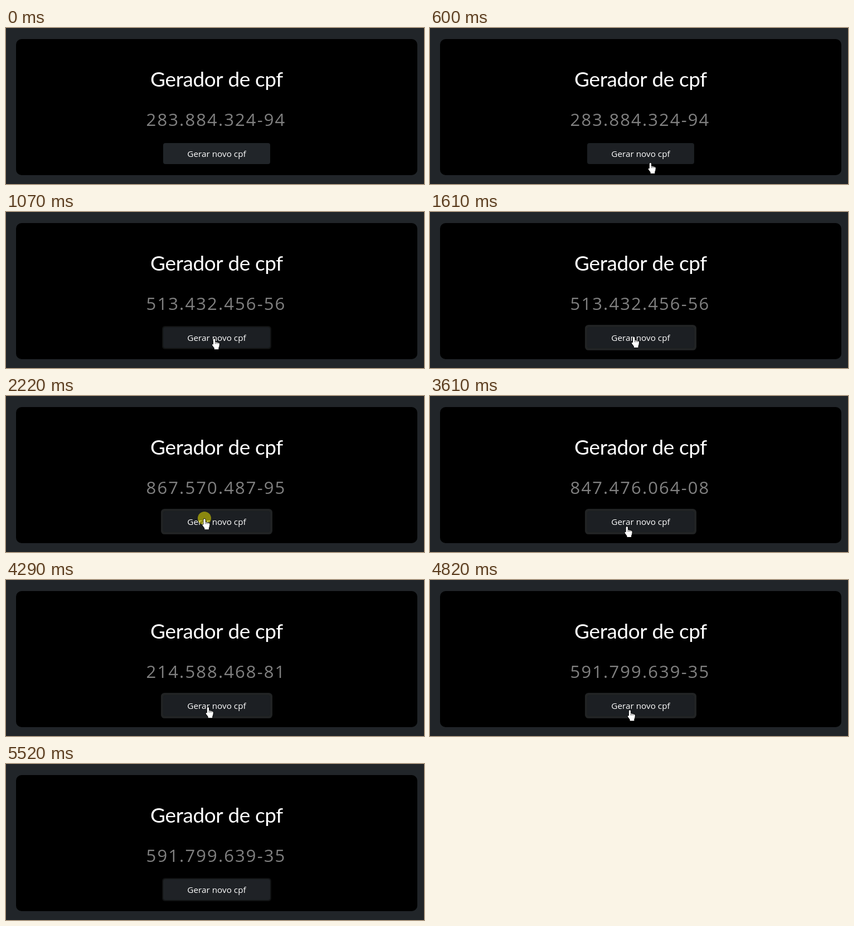
These frames come from a looping animation (750x282 px, 5580 ms). An HTML page with a canvas:

```html
<!DOCTYPE html>
<html lang="pt-BR">
<head>
<meta charset="utf-8">
<title>Gerador de cpf</title>
<style>
  html, body { margin: 0; width: 100%; height: 100%; overflow: hidden; background: #212529; }
  canvas { display: block; }
</style>
</head>
<body>
<canvas id="stage" width="750" height="282"></canvas>
<script>
const ctx = document.getElementById('stage').getContext('2d');
const LOOP = 5580, ENTER = 190, LEAVE = 5170, TICK = 67.5;
const FIRST_CLICK = 1010, CLICK_GAP = 603, PRESS = 60;

const numbers = [
  '283.884.324-94', '513.432.456-56', '867.570.487-95', '305.618.729-40',
  '976.971.433-05', '847.476.064-08', '214.588.468-81', '591.799.639-35'
];

// resting places of the pointer tip: time, x, y
const stops = [
  [190, 435, 270], [870, 374, 229], [1070, 374, 229], [2220, 356.5, 222],
  [2980, 367, 230], [3610, 353.5, 236], [4290, 363, 230], [5170, 356, 239]
];

const hand = new Path2D('M-2 1.6Q-2 0 -.4 0T1.2 1.6V6L6.5 7Q9 7.6 9 10L8.3 14.5 7.4 16.3V19.2H-.2V17L-4 11.8Q-4.6 9 -2 10.4Z');
const arrow = new Path2D('M0 0V16L3.7 12.5 6.2 18.5 8.5 17.5 6 11.7H11.5Z');

const clamp = v => Math.max(0, Math.min(1, v));
const smooth = k => k * k * (3 - 2 * k);
const mix = (a, b, k) => a + (b - a) * k;
const blend = (a, b, k) => `rgb(${a.map((v, i) => mix(v, b[i], k))})`;

function pointerAt(t) {
  const i = stops.findIndex(s => s[0] > t);
  const [t0, x0, y0] = stops[i - 1], [t1, x1, y1] = stops[i];
  const k = smooth((t - t0) / (t1 - t0));
  return [mix(x0, x1, k), mix(y0, y1, k)];
}

function clickState(t) {
  const since = t - FIRST_CLICK, last = numbers.length - 1;
  const done = Math.floor((since - PRESS) / CLICK_GAP) + 1;
  return {
    count: Math.max(0, Math.min(last, done)),
    down: since >= 0 && since < last * CLICK_GAP && since % CLICK_GAP < PRESS
  };
}

function box(x, y, w, h, r, color) {
  ctx.fillStyle = color;
  ctx.beginPath();
  ctx.roundRect(x, y, w, h, r);
  ctx.fill();
}

function label(str, x, y, font, color, spacing = 0) {
  ctx.font = font;
  ctx.letterSpacing = spacing + 'px';
  ctx.fillStyle = color;
  ctx.fillText(str, x, y);
}

function drawButton(t) {
  const fade = clamp((LOOP - t) / 120);
  const focus = Math.min(clamp((t - FIRST_CLICK) / 120), fade);
  const hover = Math.min(clamp((t - 470) / 150), fade);
  const spread = 4 * focus;
  if (focus) {
    box(282 - spread, 208 - spread, 192 + 2 * spread, 38 + 2 * spread,
      4 + spread * 0.6, `rgba(66,70,73,${focus / 2})`);
  }
  box(282, 208, 192, 38, 4, blend([33, 37, 41], [26, 30, 33], hover));
  box(283, 209, 190, 36, 3, blend([33, 37, 41], [28, 31, 35], hover));
  label('Gerar novo cpf', 378, 233, '15.3px "Open Sans", sans-serif', '#fff');
}

function drawPointer(t, down) {
  if (t < ENTER || t >= LEAVE) return;
  const step = ENTER + Math.floor((t - ENTER) / TICK) * TICK;
  const [x, y] = pointerAt(step);
  if (down) {
    ctx.fillStyle = 'rgba(232,222,0,.55)';
    ctx.beginPath();
    ctx.arc(x - 0.5, y - 1, 12, 0, 2 * Math.PI);
    ctx.fill();
  }
  const shape = y < 246 ? hand : arrow;
  ctx.save();
  ctx.translate(x, y);
  ctx.lineWidth = 1.4;
  ctx.strokeStyle = '#000';
  ctx.stroke(shape);
  ctx.fillStyle = '#fff';
  ctx.fill(shape);
  if (shape === hand) {
    ctx.lineWidth = 0.7;
    ctx.beginPath();
    for (let dx = 1.4; dx < 7; dx += 2.5) {
      ctx.moveTo(dx, 6.5);
      ctx.lineTo(dx, 9.5);
    }
    ctx.stroke();
  }
  ctx.restore();
}

function draw(now) {
  const t = now % LOOP;
  const { count, down } = clickState(t);
  ctx.textAlign = 'center';
  ctx.fillStyle = '#212529';
  ctx.fillRect(0, 0, 750, 282);
  box(18, 20, 720, 246, 10, '#000');
  label('Gerador de cpf', 378, 105.5, '37px Lato, "Open Sans", sans-serif', '#fff', -0.4);
  label(numbers[count], 377, 177, '500 31px "Open Sans", sans-serif', '#808080', 2.1);
  drawButton(t);
  drawPointer(t, down);
}

const start = performance.now();
function loop() {
  draw(performance.now() - start);
  requestAnimationFrame(loop);
}
loop();
</script>
</body>
</html>
```
